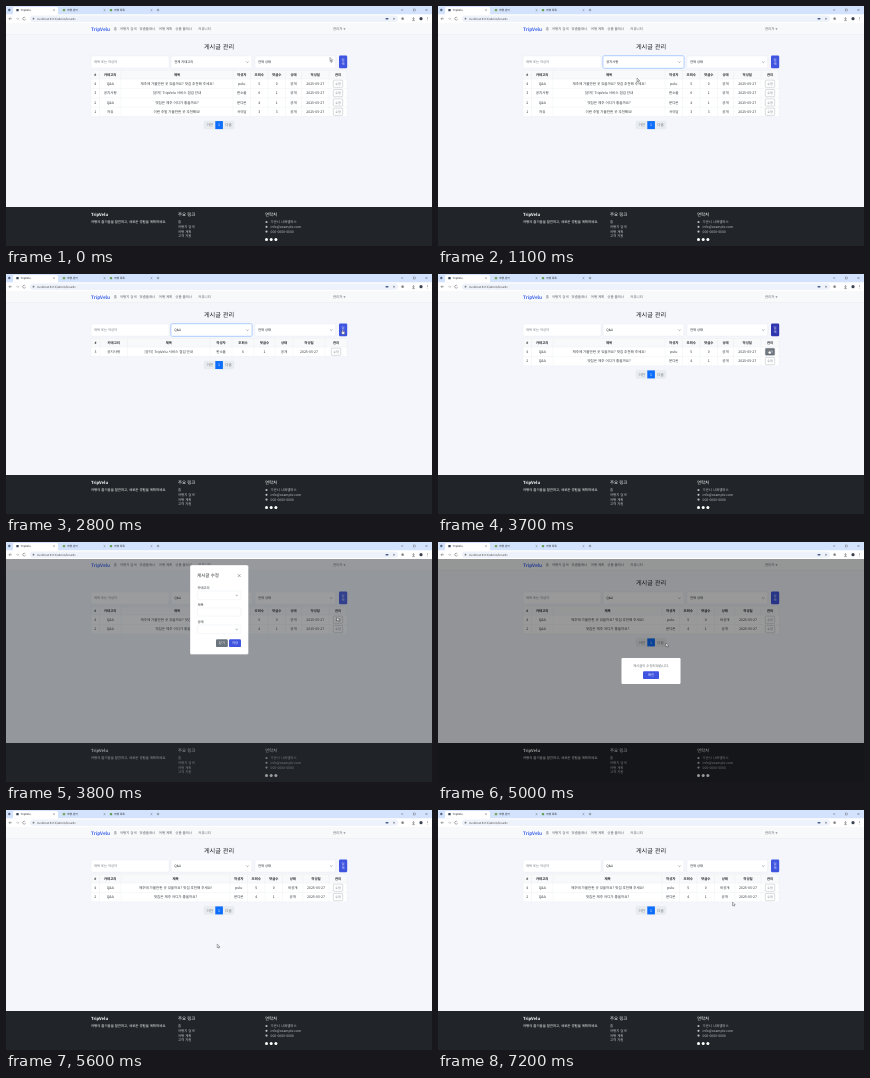
An HTML page that plays this animation: 426 px wide and 240 px high, repeating every 7300 ms.

```html
<!DOCTYPE html>
<html lang="ko">
<head>
<meta charset="utf-8">
<title>게시글 관리</title>
<style>
  html, body { margin: 0; width: 100%; height: 100%; overflow: hidden; background: #f4f6fb; }
  svg { display: block; width: 100vw; height: 100vh; }
  text {
    font-family: "Noto Sans CJK KR", "Noto Sans KR", "Noto Sans CJK", "Noto Sans", sans-serif;
    text-rendering: geometricPrecision;
    white-space: pre;
  }
</style>
</head>
<body>
<svg viewBox="0 0 426 240">
  <g id="still"></g>
  <g id="live"></g>
  <g id="pointer"></g>
</svg>
<script>
const LOOP = 7300, STEP = 100;
const INK = '#212529', GRAY = '#6c757d', LINE = '#dee2e6', PRIMARY = '#3f55e0';
const BRAND = 'TripVelu';

const rect = (x, y, w, h, fill, { r = 0, stroke = 'none', sw = .3 } = {}) =>
  `<rect x="${x}" y="${y}" width="${w}" height="${h}" rx="${r}" fill="${fill}" stroke="${stroke}" stroke-width="${sw}"/>`;
const dot = (x, y, r, fill) => `<circle cx="${x}" cy="${y}" r="${r}" fill="${fill}"/>`;
const path = (d, stroke = '#444', sw = .45, fill = 'none') =>
  `<path d="${d}" stroke="${stroke}" stroke-width="${sw}" fill="${fill}"/>`;
const esc = s => String(s).replace(/&/g, '&amp;');
// cy is the vertical middle of the line
const text = (s, x, cy, { size = 3.55, fill = INK, bold = 400, at = 'start' } = {}) =>
  `<text x="${x}" y="${cy + size * .36}" font-size="${size}" font-weight="${bold}" fill="${fill}" text-anchor="${at}">${esc(s)}</text>`;
const mid = (s, x, cy, o = {}) => text(s, x, cy, { ...o, at: 'middle' });
const chevron = (x, y) => path(`M${x - 1.1} ${y - .5}l1.1 1.1 1.1-1.1`, '#343a40', .4);
const cross = (x, y, r, c = '#444', sw = .35) =>
  path(`M${x - r} ${y - r}l${2 * r} ${2 * r}m0 ${-2 * r}l${-2 * r} ${2 * r}`, c, sw);

function field(x, y, w, h, label, { select = true, focus = false, fill = INK, size = 3.3 } = {}) {
  const ring = focus ? rect(x - .4, y - .4, w + .8, h + .8, 'none', { r: 1.6, stroke: '#b9d3fe', sw: .9 }) : '';
  return ring
    + rect(x, y, w, h, '#fff', { r: 1.3, stroke: focus ? '#86b7fe' : LINE })
    + text(label, x + 3, y + h / 2, { size, fill })
    + (select ? chevron(x + w - 4.3, y + h / 2) : '');
}

function button(x, y, w, h, label, fill, size = 3.3) {
  return rect(x, y, w, h, fill, { r: 1.2 }) + mid(label, x + w / 2, y + h / 2, { size, fill: '#fff' });
}

function browser() {
  let s = rect(0, 0, 426, 8.5, '#d3e3fd') + rect(7, 1, 45, 8, '#fff', { r: 1.5 })
    + dot(3.3, 4, 1.2, '#5b6b85');
  [[11.5, BRAND, '#3a4a5c', 48], [58, '여행 관리', '#78a65a', 98.5], [105, '여행 목록', '#6aa35c', 145.5]]
    .forEach(([x, name, c, end]) => {
      s += rect(x - 1.2, 2.9, 2.4, 2.4, c, { r: .4 }) + text(name, x + 3, 4.1, { size: 2.7 }) + cross(end, 4.1, .8);
    });
  s += path('M150.8 4h2.4m-1.2-1.2v2.4')
    + path('M395 4h2.2') + rect(407.3, 3, 2, 2, 'none', { stroke: '#444' }) + cross(420.5, 4, 1);
  s += rect(0, 8.4, 426, 8.6, '#fff') + rect(24, 9.4, 368, 6.6, '#eef2fa', { r: 3.3 })
    + path('M5.8 12.7h-2.8m1.2-1.2l-1.2 1.2 1.2 1.2')
    + path('M10 12.7h2.8m-1.2-1.2l1.2 1.2-1.2 1.2', '#aaa')
    + path('M19.3 12a1.4 1.4 0 1 0 .1 1.2')
    + dot(27.5, 12.7, .9, '#777')
    + text('localhost:5173/admin/boards', 31, 12.7, { size: 2.8, fill: '#444' })
    + rect(379.5, 12, 3, 1.4, '#4a5c88', { r: .6 }) + dot(388, 12.7, 1, '#9aa0ac')
    + rect(395.5, 11.6, 2.2, 2.2, '#777', { r: .4 })
    + path('M407.5 11v2.6m-1.2-1l1.2 1.1 1.2-1.1m-2.5 2h2.6')
    + dot(415, 12.7, 1.6, '#3c4350');
  [11.4, 12.7, 14].forEach(y => s += dot(421.5, y, .35, '#444'));
  return s;
}

function nav() {
  let s = rect(0, 17, 426, 11.4, '#f8f9fa') + rect(0, 28.2, 426, .4, '#e3e6ec')
    + text(BRAND, 85, 23, { size: 4.7, bold: 700, fill: '#3b62ee' });
  [['홈', 107.8], ['여행지 검색', 114], ['맞춤플래너', 133.6], ['여행 계획', 152.8], ['상품 플래너', 169.3], ['커뮤니티', 192.3]]
    .forEach(([name, x]) => s += text(name, x, 23, { size: 3.4, fill: '#5a6067' }));
  return s + text('관리자', 327, 23, { size: 3.4, fill: '#5a6067' }) + path('M337.4 22.5h2.2l-1.1 1.2z', 'none', 0, '#5a6067');
}

function footer() {
  let s = rect(0, 201, 426, 39, INK)
    + text(BRAND, 85, 208.4, { size: 4.2, bold: 700, fill: '#fff' })
    + text('여행의 즐거움을 발견하고, 새로운 경험을 계획하세요.', 85, 216, { size: 3.4, bold: 500, fill: '#fff' })
    + text('주요 링크', 172, 208.2, { size: 4.4, bold: 500, fill: '#fff' })
    + text('연락처', 259, 208.2, { size: 4.4, bold: 500, fill: '#fff' });
  ['홈', '여행지 검색', '여행 계획', '고객 지원'].forEach((name, i) =>
    s += text(name, 172, 216 + i * 4.75, { size: 3.4, fill: '#c3c6ca' }));
  ['가온시 나래캠퍼스', 'info@example.com', '000-0000-0000'].forEach((name, i) => {
    const y = 216 + i * 4.8;
    s += dot(260.5, y, 1.1, '#b9bcc0') + text(name, 264.6, y, { size: 3.4, fill: '#c3c6ca' });
  });
  [260.5, 265.2, 269.9].forEach(x => s += dot(x, 233.6, 1.5, '#fff'));
  return s;
}

const HEAD = ['#', '카테고리', '제목', '작성자', '조회수', '댓글수', '상태', '작성일', '관리'];
const DATE = '2025-05-27';
const trip = ['4', 'Q&A', '제주에 가볼만한 곳 있을까요? 맛집 추천해 주세요!', 'pulu', '5', '0', '공개', DATE];
const notice = ['3', '공지사항', `[공지] ${BRAND} 서비스 점검 안내`, '한소율', '6', '1', '공개', DATE];
const food = ['2', 'Q&A', '맛집은 제주 어디가 좋을까요?', '문다온', '4', '1', '공개', DATE];
const free = ['1', '자유', '이번 주말 가볼만한 곳 추천해요!', '서이담', '3', '3', '공개', DATE];
const hidden = trip.map((v, i) => i === 6 ? '비공개' : v);
const wide = [85, 93.5, 115, 227, 244.5, 262, 279.5, 295.5, 323, 341];

const lists = {
  all: { cols: wide, rows: [trip, notice, food, free] },
  notice: { cols: [85, 94, 121.5, 204, 226, 248, 269, 287, 319, 341], rows: [notice] },
  qna: { cols: wide, rows: [trip, food] },
  edited: { cols: [85, 93.5, 115, 224, 241.5, 259, 276.5, 297, 323, 341], rows: [hidden, food] }
};

function table({ cols, rows }, hover) {
  const top = 64.5, head = 8.6, rowH = 9.35, h = head + rowH * rows.length;
  const center = i => (cols[i] + cols[i + 1]) / 2;
  let s = rect(85, top, 256, h, '#fff') + rect(85, top, 256, head, '#f8f9fa');
  HEAD.forEach((name, i) => s += mid(name, center(i), top + head / 2, { size: 3.4, bold: 700 }));
  rows.forEach((row, r) => {
    const y = 77.75 + r * rowH, on = hover && r === 0;
    row.forEach((v, i) => s += mid(v, center(i), y, { size: 3.5, fill: '#33373b' }));
    s += rect(center(8) - 4.7, y - 3.6, 9.4, 7.2, on ? GRAY : '#fff', { r: .9, stroke: GRAY, sw: .25 })
      + mid('수정', center(8), y, { size: 3.1, fill: on ? '#fff' : GRAY });
  });
  let d = `M85 ${top}h256`;
  for (let r = 0; r <= rows.length; r++) d += `M85 ${top + head + r * rowH}h256`;
  cols.forEach(x => d += `M${x} ${top}v${h}`);
  s += path(d, LINE, .25);

  const y = 81.7 + rowH * rows.length;
  return s + rect(198, y - 4, 30, 8, '#e9ecef', { r: 1.3, stroke: LINE })
    + rect(209.3, y - 4, 7.6, 8, '#0d6efd')
    + mid('이전', 203.7, y, { fill: GRAY }) + mid('1', 213.1, y, { fill: '#fff' }) + mid('다음', 222.5, y, { fill: GRAY });
}

const shade = (fill, a) => `<rect y="17" width="426" height="223" fill="${fill}" opacity="${a}"/>`;

function editor({ filled, focus, status }) {
  const opt = { size: 3.3 };
  return shade(INK, .45)
    + rect(184, 23, 58.5, 89.5, '#fff', { r: 1.6, stroke: '#8b8d90' })
    + text('게시글 수정', 191, 33.6, { size: 4.5, bold: 500 }) + cross(233.2, 33.6, 1.4, '#555', .45)
    + text('카테고리', 191.5, 45.5, opt) + field(191.3, 49, 43.7, 8.6, filled ? 'Q&A' : '')
    + text('제목', 191.5, 62.5, opt)
    + field(191.3, 66, 43.7, 8.2, filled ? '제주에 가볼만한 곳 있을' : '', { select: false })
    + text('상태', 191.5, 79.4, opt) + field(191.3, 83, 43.7, 8.6, filled ? status : '', { focus })
    + button(210, 97.3, 11.8, 7.8, '닫기', GRAY) + button(223, 97.3, 12, 7.8, '저장', PRIMARY);
}

const notify = () => shade('#000', .4)
  + rect(183.5, 116, 59, 26, '#fff', { r: 1.2 })
  + mid('게시글이 수정되었습니다.', 213, 123.4, { size: 3.4, fill: '#62666b' })
  + button(205, 129.3, 16, 7.8, '확인', PRIMARY);

function scene(t) {
  const within = (a, b) => t >= a && t < b;
  const list = t < 1500 ? 'all' : t < 2900 ? 'notice' : t < 5000 ? 'qna' : 'edited';
  const category = t < 1100 ? '전체 카테고리' : t < 2400 ? '공지사항' : 'Q&A';
  const focus = within(800, 1500) || within(1900, 2900);
  const pressed = within(1500, 1900) || within(2900, 3800);
  let s = field(165.2, 50, 80.6, 12, category, { focus })
    + rect(333, 49.6, 8.2, 12.6, pressed ? '#3035b0' : PRIMARY, { r: 1.2 })
    + mid('검', 337.1, 53.5, { size: 3.3, fill: '#fff' }) + mid('색', 337.1, 58.3, { size: 3.3, fill: '#fff' })
    + table(lists[list], within(3500, 3800));
  if (within(3800, 5000))
    s += editor({ filled: t >= 3900, focus: within(4300, 4800), status: t < 4600 ? '공개' : '비공개' });
  if (within(5000, 5600)) s += notify();
  return s;
}

// time, x, y of the pointer tip
const route = [
  [0, 324, 51.5], [200, 318, 53], [700, 215, 56], [900, 208, 57], [1100, 199, 72],
  [1400, 337, 56], [1600, 337, 56], [1900, 208, 57], [2000, 196.7, 71], [2400, 197, 80],
  [2800, 336.5, 56], [3100, 336, 57], [3500, 331, 76], [3800, 331, 75.5], [4100, 266, 81],
  [4300, 224, 87], [4600, 216, 88], [4800, 229, 100], [5000, 228, 101], [5300, 212, 134.5],
  [5500, 212, 134.5], [5600, 211.2, 134], [5800, 213, 131], [6400, 284, 78], [6800, 290, 79],
  [7100, 294.5, 92], [7200, 294.5, 92]
];

function tip(t) {
  const i = Math.max(1, route.findIndex(k => k[0] >= t));
  const [a, b] = [route[i - 1], route[i]];
  const p = (t - a[0]) / (b[0] - a[0]), e = p * p * (3 - 2 * p);
  return [a[1] + (b[1] - a[1]) * e, a[2] + (b[2] - a[2]) * e];
}

function pointer(t) {
  const [x, y] = tip(t);
  const hand = [[1400, 1700], [2800, 3200], [3500, 3800], [4800, 5000], [5300, 5600]].some(([a, b]) => t >= a && t < b);
  const d = hand
    ? 'M-.4 0q.5-.5.9 0v1.5l1.4.4q.5.2.4.8l-.4 1.6h-2.1l-1.3-1.8q.2-.6 1.1 0z'
    : 'M0 0v3.7l.9-.8.6 1.4.6-.3-.6-1.3h1.2z';
  return `<g transform="translate(${x} ${y})">${path(d, '#222', .35, '#fff')}</g>`;
}

const el = id => document.getElementById(id);
el('still').innerHTML = rect(0, 0, 426, 240, '#f4f6fb') + browser() + nav()
  + mid('게시글 관리', 213, 41.2, { size: 6.2, bold: 500 })
  + field(85, 50, 78, 12, '제목 또는 작성자', { select: false, fill: GRAY })
  + field(249, 50, 80.6, 12, '전체 상태')
  + footer();

let shown = -1, markup = '';
function draw() {
  const t = Math.floor(performance.now() % LOOP / STEP) * STEP;
  if (t !== shown) {
    shown = t;
    const next = scene(t);
    if (next !== markup) el('live').innerHTML = markup = next;
    el('pointer').innerHTML = pointer(t);
  }
  requestAnimationFrame(draw);
}
draw();
</script>
</body>
</html>
```
